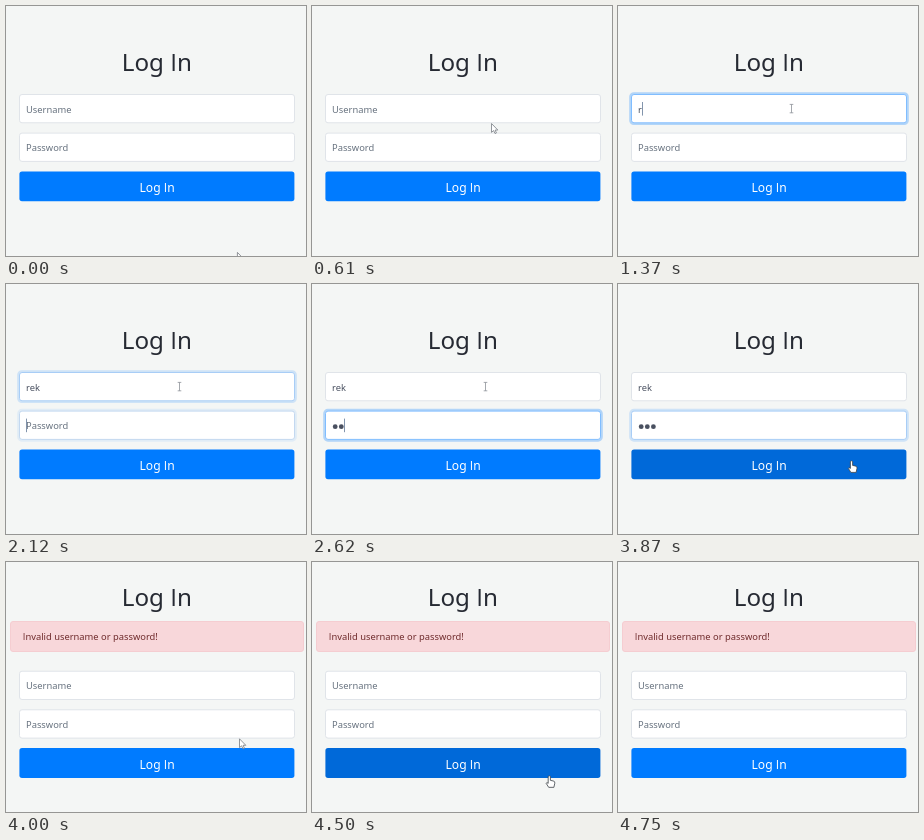
Write an HTML page that moves like this. It is 300x250 px and loops after 5500 ms.

```html
<!DOCTYPE html>
<html lang="en">
<head>
<meta charset="utf-8">
<title>Log In</title>
<style>
html, body { margin: 0; width: 100%; height: 100%; overflow: hidden; background: #f4f6f5; }
svg { display: block; width: 100%; height: 100%; }
text { font-family: "Noto Sans", "Open Sans", sans-serif; font-size: 9.35px; white-space: pre; }
.cap { font-family: "Open Sans", sans-serif; }
.title { font-size: 24.2px; fill: #262a33; text-anchor: middle; }
.label { font-size: 12.1px; fill: #fff; text-anchor: middle; }
.hint { fill: #67727f; }
.typed { fill: #495060; }
.ring { fill: none; stroke: #007bff; stroke-width: 2.2; }
.caret { stroke: #7488a3; stroke-width: .9; }
#arrow, #hand { fill: #fff; stroke: #3c4248; stroke-width: .8; stroke-linejoin: round; }
#arrow { stroke: #777b82; }
#beam { fill: none; stroke: #8d9298; stroke-width: .8; }
</style>
</head>
<body>
<svg viewBox="0 0 300 250">
  <text id="title" class="title" x="150.8" y="64.6">Log <tspan class="cap">I</tspan>n</text>
  <g id="alert">
    <rect x="4.5" y="59.5" width="293" height="30" rx="2.5" fill="#f8d7da" stroke="#f5cdd1"/>
    <text x="16.8" y="78.4" fill="#6f2b2c"><tspan class="cap">I</tspan>nvalid username or password!</text>
  </g>
  <g id="form">
    <g id="user"></g>
    <g id="pass"></g>
    <rect id="button" x="13.4" y="165.4" width="275" height="29.8" rx="2.6"/>
    <text class="label" x="151.1" y="186">Log <tspan class="cap">I</tspan>n</text>
  </g>
  <path id="arrow" d="M0 0V8.8L2.1 7L3.5 10L4.9 9.4L3.6 6.5H6.3Z"/>
  <path id="hand" d="M-1.1 .7Q0 -.6 1.1 .7V4.6L4.6 5.4Q5.7 5.9 5.5 7.5L4.6 11.6H-.6L-3.1 7.6Q-2.9 6.1 -1.1 7.6Z"/>
  <path id="beam" d="M-1.8 -4.2H1.8M0 -4.2V4.2M-1.8 4.2H1.8"/>
</svg>
<script>
const LOOP = 5500, TICK = 125, FADE = 180, BLINK = 500;
const FAIL = 4000, GONE = 4750, SHIFT = 20.7;
const FIELD_H = 28.3, BUTTON_Y = 165.4, BUTTON_H = 29.8;
const NAME = "rek";

// When each field is clicked, left and typed into
const user = makeField("user", "Username", 88.5, { on: 600, off: 2050, keys: [1375, 1625, 1750] });
const pass = makeField("pass", "Password", 127.1, { on: 2070, off: 3800, keys: [2500, 2625, 2750] });

const moves = [
  { from: 0, to: 625, a: [231.4, 246.4], b: [173.5, 102.6], ease: p => p * p * (3 - 2 * p) },
  { from: 3375, to: 3600, a: [173.5, 102.6], b: [233.5, 176.8], ease: p => 1 - (1 - p) ** 3 },
  { from: 4125, to: 4700, a: [233.5, 176.8], b: [241, 250], ease: p => p ** 1.6 }
];

function $(id) { return document.getElementById(id); }
function show(el, on) { el.setAttribute("visibility", on ? "visible" : "hidden"); }
function move(el, x, y) { el.setAttribute("transform", `translate(${x} ${y})`); }
function ramp(t, start, length) { return Math.min(1, Math.max(0, (t - start) / length)); }
function pulse(t, on, off) { return ramp(t, on, FADE) - ramp(t, off, FADE); }

function mix(a, b, k) {
  return "rgb(" + a.map((v, i) => Math.round(v + (b[i] - v) * k)).join(",") + ")";
}

function makeField(id, hint, y, timing) {
  const g = $(id);
  const dot = i => `<circle class="typed" cx="${23.2 + i * 6.1}" cy="${y + 15.6}" r="2.4"/>`;
  g.innerHTML = `
    <rect class="ring" x="12.3" y="${y - 1.2}" width="277.4" height="${FIELD_H + 2.4}" rx="3.5"/>
    <rect class="box" x="13.5" y="${y}" width="275" height="${FIELD_H}" rx="2.5" fill="#fff"/>
    <text class="hint" x="20" y="${y + 18.2}">${hint}</text>
    <text class="typed" x="20" y="${y + 18.2}"></text>
    ${[0, 1, 2].map(dot).join("")}
    <path class="caret" d="M0 ${y + 7.5}v13.6"/>`;
  const part = name => g.querySelector(name);
  return { y, ...timing, ring: part(".ring"), box: part(".box"), hint: part(".hint"),
    text: part("text.typed"), dots: g.querySelectorAll("circle"), caret: part(".caret") };
}

function drawField(f, t, failed, secret) {
  const focus = failed ? 0 : pulse(t, f.on, f.off);
  const count = failed ? 0 : f.keys.filter(k => t >= k).length;
  const dots = secret ? count : 0;
  f.ring.setAttribute("stroke-opacity", .27 * focus);
  f.box.setAttribute("stroke", mix([224, 228, 233], [128, 189, 255], focus));
  f.text.textContent = secret ? "" : NAME.slice(0, count);
  f.dots.forEach((d, i) => show(d, i < dots));
  show(f.hint, !count);

  // The caret restarts its blink at each key
  const last = Math.max(f.on, ...f.keys.filter(k => t >= k));
  const active = t >= f.on && t < f.off;
  show(f.caret, active && (t - last) % (2 * BLINK) < BLINK);
  const end = 20.5 + (secret ? dots * 6.1 : f.text.getComputedTextLength());
  move(f.caret, Math.floor(end) + .5, 0);
}

function pointerAt(t) {
  const m = moves.filter(v => t >= v.from).pop();
  const k = m.ease(ramp(t, m.from, m.to - m.from));
  return m.a.map((v, i) => v + (m.b[i] - v) * k);
}

function pointerKind(y) {
  const over = (top, height) => y >= top && y <= top + height;
  if (over(BUTTON_Y, BUTTON_H)) return "hand";
  return over(user.y, FIELD_H) || over(pass.y, FIELD_H) ? "beam" : "arrow";
}

function draw(time) {
  const t = Math.floor((time + 5) / TICK) * TICK;
  const failed = t >= FAIL;
  const shift = failed ? SHIFT : 0;
  move($("title"), 0, -shift);
  move($("form"), 0, shift);
  show($("alert"), failed);
  drawField(user, t, failed, false);
  drawField(pass, t, failed, true);

  const hover = failed ? pulse(t, 4260, 4530) : pulse(t, 240, 300) + pulse(t, 3500, FAIL);
  $("button").setAttribute("fill", mix([0, 123, 255], [0, 105, 217], hover));

  const [x, y] = pointerAt(t);
  const kind = pointerKind(y - shift);
  for (const id of ["arrow", "hand", "beam"]) {
    show($(id), id === kind && t < GONE);
    move($(id), x, y);
  }
}

const start = performance.now();
function loop() {
  draw((performance.now() - start) % LOOP);
  requestAnimationFrame(loop);
}
loop();
</script>
</body>
</html>
```
